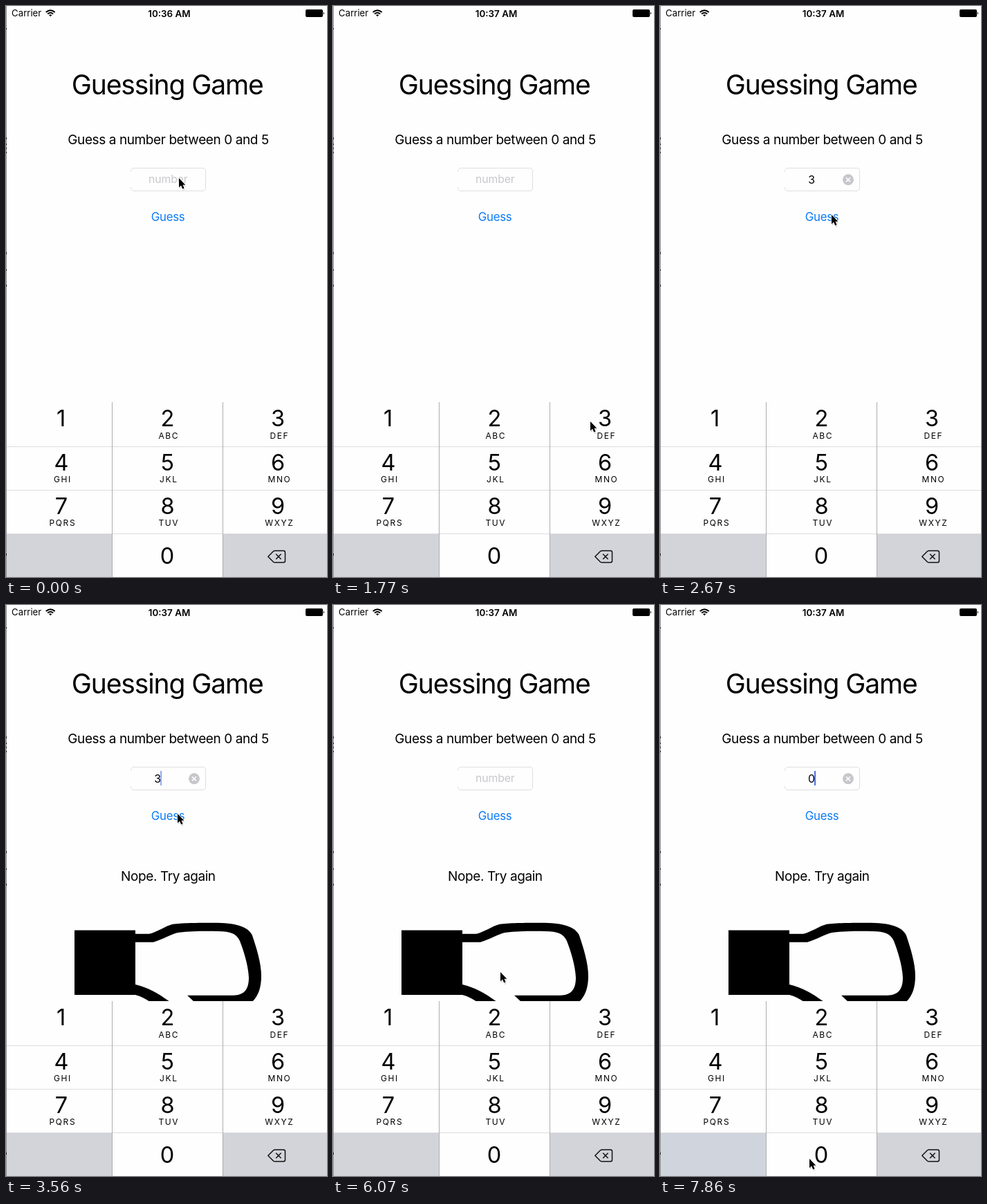
An HTML page that plays this animation: 464x826 px, repeating every 8000 ms.

```html
<!DOCTYPE html>
<html lang="en">
<head>
<meta charset="utf-8">
<title>Guessing Game</title>
<style>
html, body { margin: 0; width: 100%; height: 100%; overflow: hidden; background: #fefefe; }
svg { display: block; width: 100vw; height: 100vh; }
text { font-family: Inter, "Open Sans", sans-serif; text-anchor: middle; }
.title { font-size: 39px; letter-spacing: -1.1px; }
.body { font-size: 19px; letter-spacing: -.41px; }
.link { font-size: 16.8px; letter-spacing: -.25px; fill: #0b7bf5; }
.field { font-size: 15.8px; letter-spacing: -.1px; }
.hint { fill: #c8c8cd; }
.status { font-size: 13.2px; }
.clock { font-size: 13.4px; font-weight: 600; }
.digits { font-size: 32.5px; }
.letters { font-size: 12px; letter-spacing: 1.6px; }
.key { fill: #d2d4da; }
.caret { fill: #4468dc; }

/* Everything changes in held steps, 54 per loop. */
.anim { animation: 8s step-end infinite; }
#before { animation-name: before; }
#after { animation-name: after; }
#empty { animation-name: empty; }
#filled { animation-name: filled; }
#three { animation-name: three; }
#zero { animation-name: zero; }
#press3 { animation-name: press3; }
#press0 { animation-name: press0; }
#guess { animation-name: tap; }
#result { animation-name: result; }
#pointer { animation-name: pointer; }
#spare { animation-name: spare; }
.caret { animation-name: blink; }

@keyframes before { 0% { opacity: 1 } 16.57%, 100% { opacity: 0 } }
@keyframes after { 0% { opacity: 0 } 16.57%, 100% { opacity: 1 } }
@keyframes empty { 0%, 68.4% { opacity: 1 } 25.83%, 96.2%, 100% { opacity: 0 } }
@keyframes filled { 0%, 68.4% { opacity: 0 } 25.83%, 96.2%, 100% { opacity: 1 } }
@keyframes three { 0% { opacity: 1 } 68.4%, 100% { opacity: 0 } }
@keyframes zero { 0% { opacity: 0 } 96.2%, 100% { opacity: 1 } }
@keyframes press3 { 0%, 25.83%, 100% { opacity: 0 } 23.97% { opacity: 1 } }
@keyframes press0 { 0%, 96.2%, 100% { opacity: 0 } 94.3% { opacity: 1 } }
@keyframes tap { 0%, 36.9%, 100% { opacity: 1 } 35.1% { opacity: .25 } }
@keyframes result { 0% { opacity: 0 } 36.9%, 100% { opacity: 1 } }
@keyframes spare { 0% { fill: #d2d4da } 90.64%, 100% { fill: #d0d4dc } }
@keyframes blink {
  0%, 7.31%, 20.27%, 31.38%, 38.8%, 51.75%, 66.57%, 75.8%, 90.64% { opacity: 0 }
  1.75%, 14.7%, 25.83%, 35.1%, 46.2%, 59.2%, 68.4%, 81.4%, 96.2%, 100% { opacity: 1 }
  44.3% { opacity: .6 }
}
@keyframes pointer {
  0% { transform: translate(250px, 249px) }
  7.31% { transform: translate(250px, 254px) }
  9.16% { transform: translate(252px, 277px) }
  11% { transform: translate(263px, 341px) }
  12.86% { transform: translate(285px, 431px) }
  14.7% { transform: translate(312px, 523px) }
  16.57% { transform: translate(336px, 593px) }
  18.4% { transform: translate(350px, 628px) }
  20.27% { transform: translate(357px, 620px) }
  22.1% { transform: translate(372px, 601px) }
  25.83% { transform: translate(371px, 595px) }
  27.68% { transform: translate(357px, 536px) }
  29.5% { transform: translate(312px, 421px) }
  31.38% { transform: translate(262px, 323px) }
  33.2% { transform: translate(248px, 302px) }
  49.9% { transform: translate(246px, 307px) }
  51.75% { transform: translate(234px, 353px) }
  53.6% { transform: translate(205px, 471px) }
  55.45% { transform: translate(170px, 591px) }
  57.3% { transform: translate(160px, 622px) }
  59.2% { transform: translate(185px, 559px) }
  61% { transform: translate(235px, 416px) }
  62.9% { transform: translate(262px, 297px) }
  64.7% { transform: translate(268px, 264px) }
  66.57% { transform: translate(268px, 254px) }
  68.4% { transform: translate(268px, 251px) }
  70.27% { transform: translate(267px, 256px) }
  72.1% { transform: translate(263px, 301px) }
  74% { transform: translate(255px, 401px) }
  75.8% { transform: translate(242px, 531px) }
  77.68% { transform: translate(225px, 666px) }
  79.5% { transform: translate(205px, 725px) }
  81.4% { transform: translate(168px, 775px) }
  83.2% { transform: translate(126px, 806px) }
  85.1% { transform: translate(110px, 846px) }
  90.64% { transform: translate(172px, 820px) }
  92.5% { transform: translate(204px, 804px) }
  94.3%, 100% { transform: translate(216px, 801px) }
}
</style>
</head>
<body>
<svg viewBox="0 0 464 826" preserveAspectRatio="none">
  <rect width="464" height="826" fill="#fefefe"/>

  <!-- Status bar -->
  <text class="status" x="29.7" y="15.4">Carrier</text>
  <g fill="none" stroke="#000" stroke-width="2">
    <path d="M57.7 9.1Q64.2 3.4 70.7 9.1M60.2 11.5Q64.2 8.1 68.2 11.5"/>
    <path d="M62 13L64.2 15.3L66.4 13Q64.2 11.4 62 13Z" fill="#000" stroke="none"/>
  </g>
  <text id="before" class="clock anim" x="236" y="15.5">10:36 AM</text>
  <text id="after" class="clock anim" x="236" y="15.5">10:37 AM</text>
  <rect x="433" y="5" width="25" height="11" rx="2"/>
  <path d="M458.8 8.5q2.4 2 0 4z"/>

  <!-- Page -->
  <text class="title" x="233.2" y="128">Guessing Game</text>
  <text class="body" x="234.6" y="200">Guess a number between 0 and 5</text>
  <path d="M180.5 240Q180.5 234.5 185 234.5H284Q288.5 234.5 288.5 239V263Q288.5 267.5 284 267.5H185Q180.5 267.5 180.5 262" fill="none" stroke="#dedee0"/>
  <g id="empty" class="anim">
    <text class="field hint" x="234.3" y="256.3">number</text>
    <rect class="caret anim" x="204.5" y="240" width="2.2" height="21"/>
  </g>
  <g id="filled" class="anim">
    <text id="three" class="field anim" x="219" y="256.5">3</text>
    <text id="zero" class="field anim" x="219" y="256.5">0</text>
    <rect class="caret anim" x="223.1" y="240" width="1.9" height="21"/>
    <circle cx="272" cy="251.3" r="8" fill="#c7c7cb"/>
    <path d="M268.9 248.2l6.2 6.2m0-6.2l-6.2 6.2" stroke="#fff" stroke-width="1.5"/>
  </g>
  <text id="guess" class="link anim" x="234.1" y="311.2">Guess</text>

  <g id="result" class="anim">
    <text class="body" x="234.4" y="398.6">Nope. Try again</text>
    <rect x="99" y="470.5" width="88" height="93.5"/>
    <path d="M187 475.7H207C217 474 231 464 241 461.8C252 460 278 459.8 300 459.8C332 459.8 350 465 356 478C362 496 369 518 369 537C369 553 365 565 356 574H272L262 564.8H325C341 565 351 560 351 539C350 520 343 499 338 486C333 475 324 472.3 308 472C285 471.5 266 472 250 473.8C240 475 227 484 213 487.7H187Z"/>
    <path d="M187 549C205 553 220 562 237 574H208C202 570 195 566 187 564Z"/>
  </g>

  <!-- Number pad -->
  <rect y="573" width="464" height="253" fill="#fefefe"/>
  <rect id="spare" class="anim key" y="764" width="153" height="62"/>
  <rect class="key" x="314" y="764" width="150" height="62"/>
  <rect id="press3" class="key anim" x="314" y="573" width="150" height="64"/>
  <rect id="press0" class="key anim" x="154" y="764" width="159" height="62"/>
  <path d="M0 637.5H464M0 700.5H464M0 763.5H464" stroke="#dddde0"/>
  <path d="M153.5 573V826M313.5 573V826" stroke="#adadb0"/>
  <g class="digits">
    <text x="79.5" y="607.8">1</text><text x="233.5" y="607.8">2</text><text x="393" y="607.8">3</text>
    <text x="80" y="671.5">4</text><text x="233.5" y="671.5">5</text><text x="393" y="671.5">6</text>
    <text x="80" y="735">7</text><text x="233.5" y="735">8</text><text x="393" y="735">9</text>
    <text x="233" y="806.5">0</text>
  </g>
  <g class="letters">
    <text x="235.3" y="625.8">ABC</text><text x="395.4" y="625.8">DEF</text>
    <text x="81.9" y="689">GHI</text><text x="235.3" y="689">JKL</text><text x="395.4" y="689">MNO</text>
    <text x="81.9" y="752">PQRS</text><text x="235.3" y="752">TUV</text><text x="395.4" y="752">WXYZ</text>
  </g>
  <path d="M378.8 796.5L386.5 788.8Q387.5 787.9 389 787.9H401Q403.5 787.9 403.5 790.4V802.6Q403.5 805.1 401 805.1H389Q387.5 805.1 386.5 804.2ZM390.2 792.8l7.4 7.4m0-7.4l-7.4 7.4" fill="none" stroke="#111" stroke-width="1.5" stroke-linejoin="round"/>

  <!-- Window edge -->
  <path d="M.5 0V826" stroke="#929292"/>
  <path d="M.5 32v2M.5 190v3M.5 199v2M.5 205v2M.5 211v2M.5 356v3M.5 381v2M.5 403v3M.5 792v3" stroke="#111"/>

  <g id="pointer" class="anim">
    <path d="M1 2V15.5L4 13L6.2 18L8.6 17L6.6 12H10Z" fill="#000" opacity=".16"/>
    <path d="M0 0V13.4L3 10.6L5.2 15.6L7.6 14.6L5.5 9.7H9.3Z" stroke="#fff" stroke-width="1.2" paint-order="stroke"/>
  </g>
</svg>
</body>
</html>
```
